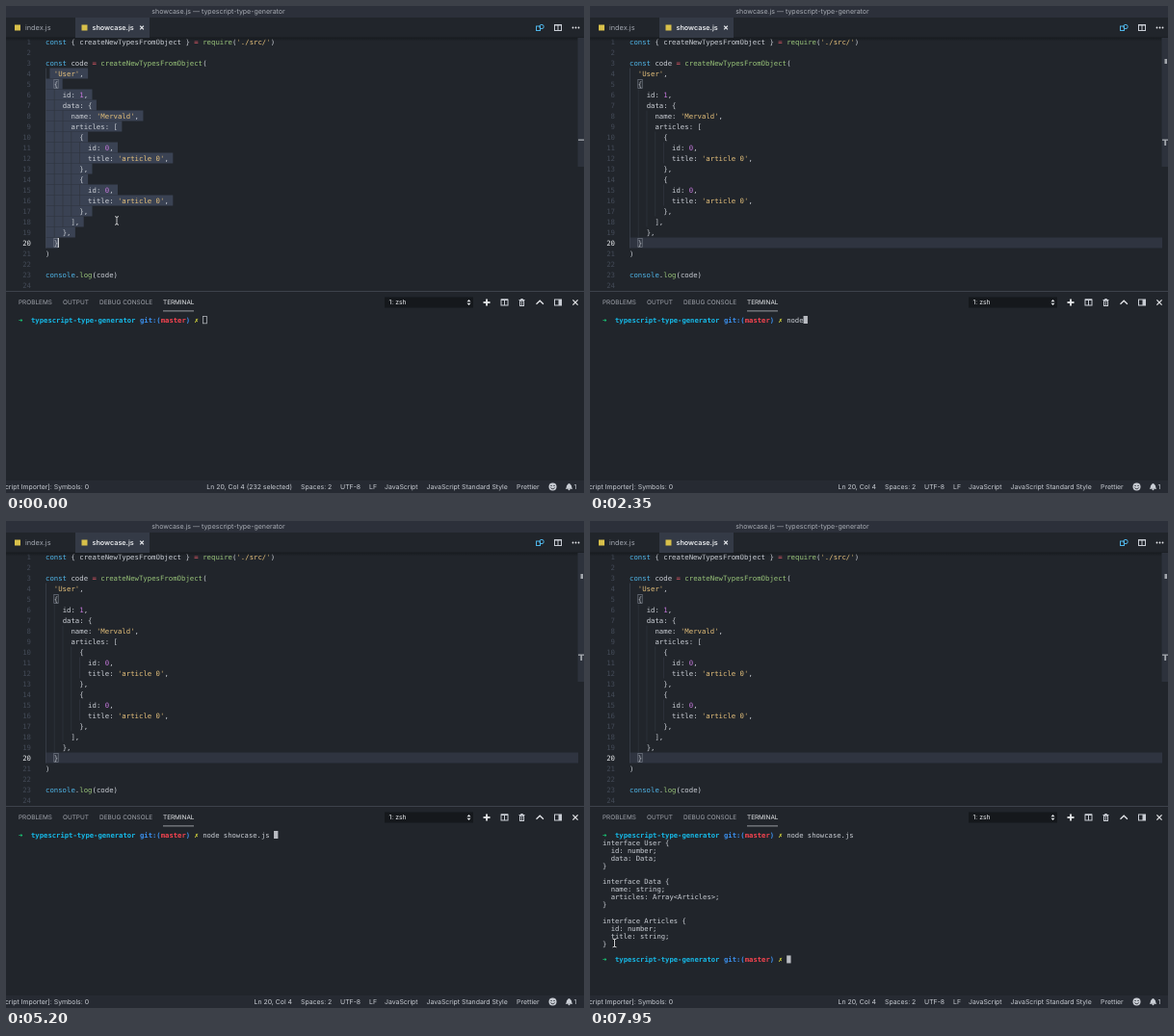
An HTML page with a canvas for the animation above (8 s loop, 600 px wide and 506 px high).

```html
<!DOCTYPE html>
<html lang="en">
<head>
<meta charset="utf-8">
<title>Type generator demo</title>
<style>
  html, body { margin: 0; width: 100%; height: 100%; overflow: hidden; background: #21252b; }
  canvas { display: block; }
</style>
</head>
<body>
<canvas id="stage" width="600" height="506"></canvas>
<script>
const ctx = document.getElementById('stage').getContext('2d');
ctx.textRendering = 'geometricPrecision';

const LOOP = 8000;
const MONO = '"DejaVu Sans Mono", monospace';
const UI = 'Inter, sans-serif';
const CODE = { x: 41, y: 37, pitch: 11, cell: 4.41, size: 7.325 };
const TERM = { x: 13, y: 326, pitch: 8.09, cell: 4.345, size: 7.217 };
const C = {
  bg: '#21252b', bar: '#2c303a', status: '#262a32', tab: '#343a46', line: '#2f3440',
  selection: '#3a4253', guide: '#31363f', border: '#3d424b', text: '#c9cdd4', bright: '#e8eaed',
  number: '#434a57', cyan: '#4fb4e6', green: '#98c379', gold: '#e5c07b', purple: '#c678dd', red: '#ee5d6c'
};

const code = `const { createNewTypesFromObject } = require('./src/')

const code = createNewTypesFromObject(
  'User',
  {
    id: 1,
    data: {
      name: 'Mervald',
      articles: [
        {
          id: 0,
          title: 'article 0',
        },
        {
          id: 0,
          title: 'article 0',
        },
      ],
    },
  }
)

console.log(code)
`.split('\n');

const output = `interface User {
  id: number;
  data: Data;
}

interface Data {
  name: string;
  articles: Array<Articles>;
}

interface Articles {
  id: number;
  title: string;
}`.split('\n');

// Event times in ms
const DESELECT = 400, FOCUS = 1200, HIDE_POINTER = 1750, ENTER = 5500, RESULT = 5700, POINTER_BACK = 7700;
const typed = [
  [1800, 'n'], [1950, 'no'], [2100, 'nod'], [2250, 'node'], [2700, 'node '],
  [3350, 'node s'], [3500, 'node sh'], [4300, 'node showcase.js ']
];

function rect(x, y, w, h, color) {
  ctx.fillStyle = color;
  ctx.fillRect(x, y, w, h);
}

function box(x, y, w, h, color, width = 0.8) {
  ctx.strokeStyle = color;
  ctx.lineWidth = width;
  ctx.strokeRect(x, y, w, h);
}

function path(color, width, ...points) {
  ctx.strokeStyle = color;
  ctx.lineWidth = width;
  ctx.beginPath();
  points.forEach(([x, y], i) => i ? ctx.lineTo(x, y) : ctx.moveTo(x, y));
  ctx.stroke();
}

function disc(x, y, r, color) {
  ctx.fillStyle = color;
  ctx.beginPath();
  ctx.arc(x, y, r, 0, 7);
  ctx.fill();
}

function label(str, x, y, size, color = C.text, weight = 400, align = 'left') {
  ctx.font = `${weight} ${size}px ${UI}`;
  ctx.textAlign = align;
  ctx.fillStyle = color;
  ctx.fillText(str, x, y + size * 0.36);
}

function mono(grid, str, col, row, color, weight = 400) {
  ctx.font = `${weight} ${grid.size}px ${MONO}`;
  ctx.textAlign = 'left';
  ctx.fillStyle = color;
  ctx.fillText(str, grid.x + col * grid.cell, grid.y + row * grid.pitch + 2.6);
}

function cross(x, y, r) {
  path(C.bright, 1.2, [x - r, y - r], [x + r, y + r]);
  path(C.bright, 1.2, [x - r, y + r], [x + r, y - r]);
}

function splitIcon(x, y) {
  box(x - 3.5, y - 3, 7, 6, C.text, 1);
  rect(x - 3.5, y - 3.5, 7, 1.5, C.text);
  path(C.text, 1, [x, y - 3], [x, y + 3]);
}

function drawTabs() {
  rect(0, 0, 600, 12, C.bar);
  label('showcase.js — typescript-type-generator', 220.5, 5.5, 7, '#a9adb5', 400, 'center');
  rect(72, 12, 77, 21, C.tab);
  rect(9, 19.5, 6, 6, '#d8c04a');
  rect(78.5, 19.5, 6, 6, '#d8c04a');
  label('index.js', 20, 22.5, 7.35, '#a0a5ae');
  label('showcase.js', 89.5, 22.5, 7.2, C.bright, 600);
  cross(141, 22.5, 1.9);

  ctx.strokeStyle = C.cyan;
  ctx.lineWidth = 1;
  ctx.strokeRect(550.5, 21, 4, 4.5);
  ctx.beginPath();
  ctx.arc(556, 21.5, 2.2, 0, 7);
  ctx.stroke();
  splitIcon(573, 22.5);
  [588.5, 591.5, 594.5].forEach(x => disc(x, 22.5, 0.9, C.bright));
}

function tokenColor(token, next) {
  if (token[0] === "'") return C.gold;
  if (/^\d/.test(token)) return C.purple;
  if (/^(const|console)$/.test(token)) return C.cyan;
  if (token === '=') return C.red;
  return /^\w/.test(token) && next === '(' ? C.green : C.text;
}

function drawSelection() {
  for (let row = 3; row < 20; row++) {
    const start = row === 3 ? 1 : 0;
    const end = code[row].length + (row < 19 ? 1 : 0);
    rect(CODE.x + start * CODE.cell, CODE.y + row * CODE.pitch - 5.5,
      (end - start) * CODE.cell, CODE.pitch, C.selection);
  }
}

function drawEditor(t) {
  const top = row => CODE.y + row * CODE.pitch - 5.5;
  const selected = t < DESELECT;
  if (selected) drawSelection();
  else rect(41, top(19), 553, 11, C.line);

  // Indent guides: column, first row, last row
  [[0, 3, 19], [2, 5, 18], [4, 7, 17], [6, 9, 16], [8, 10, 11], [8, 14, 15]].forEach(([col, from, to]) =>
    rect(CODE.x + col * CODE.cell, top(from), 0.7, (to - from + 1) * CODE.pitch, col ? C.guide : '#3e444f'));

  [4, 19].forEach(row => box(CODE.x + 2 * CODE.cell, top(row) + 1, 4.4, 9, '#737985', 0.7));

  code.forEach((line, row) => {
    ctx.font = `${CODE.size}px ${MONO}`;
    ctx.textAlign = 'right';
    ctx.fillStyle = row === 19 ? C.bright : C.number;
    ctx.fillText(row + 1, 26, CODE.y + row * CODE.pitch + 2.6);
    for (const m of line.matchAll(/'[^']*'|\w+|[^\s\w]/g)) {
      mono(CODE, m[0], m.index, row, tokenColor(m[0], line[m.index + m[0].length]));
    }
  });

  if (t < FOCUS) rect(53.8, top(19) + 0.5, 1, 10, C.bright);

  const shade = ctx.createLinearGradient(0, 32.5, 0, 36.5);
  shade.addColorStop(0, '#14171bcc');
  shade.addColorStop(1, '#14171b00');
  rect(0, 32.5, 600, 4, shade);

  rect(593.5, 33, 6.5, 134, '#2d323c');
  rect(594, 138.5, 6, 1.3, '#a3a7ad');
  if (!selected) {
    rect(596.5, 55, 2.5, 5, '#a3a7ad');
    rect(596.3, 139, 1.8, 6, '#a3a7ad');
  }
}

function drawPanelHeader() {
  rect(0, 296, 600, 210, C.bg);
  rect(0, 296, 600, 1, C.border);
  const muted = '#a0a4ac', y = 308;
  label('PROBLEMS', 13, y, 6.45, muted);
  label('OUTPUT', 59, y, 6.45, muted);
  label('DEBUG CONSOLE', 97, y, 6.45, muted);
  label('TERMINAL', 163, y, 6.4, C.bright);
  rect(163, 316.5, 32, 0.8, '#b5b8be');

  rect(393, 302.5, 92, 11, '#15181c');
  label('1: zsh', 397.5, y, 6.8, C.bright);
  for (const s of [-1, 1]) {
    ctx.fillStyle = C.bright;
    ctx.beginPath();
    ctx.moveTo(478.5, y + s * 0.7);
    ctx.lineTo(482.5, y + s * 0.7);
    ctx.lineTo(480.5, y + s * 3);
    ctx.fill();
  }

  rect(495.5, y - 0.9, 7, 1.8, C.bright);
  rect(498.1, y - 3.5, 1.8, 7, C.bright);
  splitIcon(517.5, y);
  rect(532.5, y - 3, 6, 1, C.text);
  rect(534.3, y - 4, 2.4, 1, C.text);
  box(533.5, y - 1.8, 4, 5.3, C.text, 1);
  path(C.text, 0.8, [535.5, y - 1], [535.5, y + 3]);
  path(C.bright, 1.2, [550.5, y + 1.8], [554.2, y - 1.8], [557.9, y + 1.8]);
  box(569.5, y - 3, 7, 6, C.text, 1);
  rect(573.5, y - 3, 3, 6, C.text);
  cross(591, y, 2.6);
}

function drawPrompt(row) {
  const parts = [
    ['➜', 0, '#19d67c'], ['typescript-type-generator', 3, '#16b8e6'], ['git:(', 29, '#3b8eea'],
    ['master', 34, '#f4434f'], [')', 40, '#3b8eea'], ['✗', 42, '#e5e53c']
  ];
  parts.forEach(([str, col, color]) => mono(TERM, str, col, row, color, 700));
}

function drawTerminal(t) {
  const command = typed.reduce((last, [time, str]) => t >= time ? str : last, '');
  drawPrompt(0);
  mono(TERM, command, 44, 0, C.text);

  let row = 0, col = 44 + command.length;
  if (t >= RESULT) {
    output.forEach((line, i) => mono(TERM, line, 0, i + 1, C.text));
    row = 16;
    col = 44;
    drawPrompt(row);
  } else if (t >= ENTER) {
    row = 1;
    col = 0;
  }
  const x = TERM.x + col * TERM.cell, y = TERM.y + row * TERM.pitch - 4;
  if (t < FOCUS) box(x + 0.4, y + 0.4, 3.9, 7.4, '#aeb2b8', 0.8);
  else rect(x, y, 4.35, 8, '#b9bcc2');
}

function drawStatus(t) {
  const y = 499.5, size = 6.9;
  rect(0, 493, 600, 13, C.status);
  label('[TypeScript Importer]: Symbols: 0', 86, y, size, C.text, 400, 'right');
  label('Ln 20, Col 4' + (t < DESELECT ? ' (232 selected)' : ''), 297, y, size, C.text, 400, 'right');
  [['Spaces: 2', 306], ['UTF-8', 347], ['LF', 377], ['JavaScript', 393],
    ['JavaScript Standard Style', 436.5], ['Prettier', 530], ['1', 589.5]]
    .forEach(([str, x]) => label(str, x, y, size));

  disc(567.5, y, 4, C.text);
  disc(566, y - 1.1, 0.7, C.status);
  disc(569, y - 1.1, 0.7, C.status);
  ctx.strokeStyle = C.status;
  ctx.lineWidth = 0.8;
  ctx.beginPath();
  ctx.arc(567.5, y + 0.3, 2, 0.2, 2.9);
  ctx.stroke();

  ctx.fillStyle = C.text;
  ctx.beginPath();
  ctx.moveTo(580.8, y + 2.3);
  ctx.quadraticCurveTo(582, y + 1, 582, y - 1);
  ctx.quadraticCurveTo(584.5, y - 6, 587, y - 1);
  ctx.quadraticCurveTo(587, y + 1, 588.2, y + 2.3);
  ctx.fill();
  disc(584.5, y + 2.8, 1, C.text);
}

function ease(t, from, to) {
  const p = Math.min(1, Math.max(0, (t - from) / (to - from)));
  return p * p * (3 - 2 * p);
}

function drawPointer(t) {
  if (t >= HIDE_POINTER && t < POINTER_BACK) return;
  const [a, b, p] = t < HIDE_POINTER
    ? [[115, 223], [213, 339], ease(t, 450, 950)]
    : [[213, 339], [25.5, 438.5], ease(t, POINTER_BACK, 7920)];
  const x = a[0] + (b[0] - a[0]) * p, y = a[1] + (b[1] - a[1]) * p;
  for (const [color, width] of [['#14171b', 2], ['#e4e6e9', 0.9]]) {
    path(color, width, [x, y - 4], [x, y + 4]);
    for (const s of [-1, 1]) path(color, width, [x - 2, y + s * 4.4], [x, y + s * 3.6], [x + 2, y + s * 4.4]);
  }
}

function draw() {
  const t = performance.now() % LOOP;
  rect(0, 0, 600, 506, C.bg);
  drawEditor(t);
  drawTabs();
  drawPanelHeader();
  drawTerminal(t);
  drawStatus(t);
  drawPointer(t);
  requestAnimationFrame(draw);
}
draw();
</script>
</body>
</html>
```
